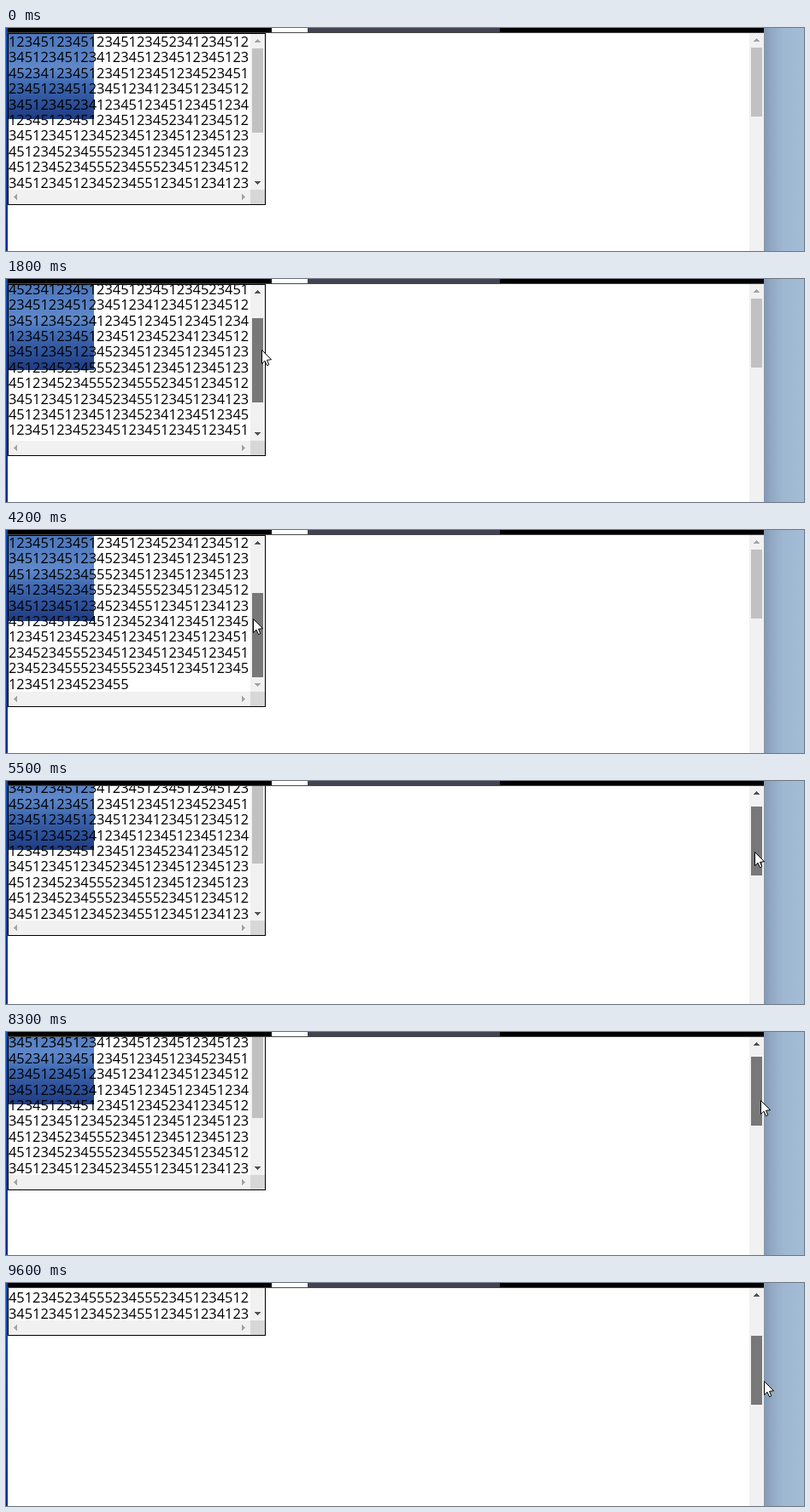
Write an HTML page with a canvas that moves like this. It is 934 px wide and 262 px high and loops after 10000 ms.

```html
<!DOCTYPE html>
<html lang="en">
<head>
<meta charset="utf-8">
<title>Scrolling box</title>
<style>
  html, body { margin: 0; width: 100%; height: 100%; overflow: hidden; background: #fff; }
  canvas { display: block; }
</style>
</head>
<body>
<canvas id="stage" width="934" height="262"></canvas>
<script>
const ctx = document.getElementById('stage').getContext('2d');
const LOOP = 10000, STEP = 100;
const LINE_HEIGHT = 18.4, BOX_RATIO = 1.86, PAGE_RATIO = 3.74;

// The text is the same count typed over and over, with short slips between.
const COUNT = '12345';
const BREAK = COUNT.repeat(3) + '1234';
const SLIPS = [
  '234' + BREAK, '234', '2345' + BREAK, '234' + BREAK, '234', '2345',
  '2345552345', '2345552345552345', '23455' + COUNT + '1234',
  '234', '2345', '2345552345', '2345552345552345', '23455'
];
const LINES = SLIPS.map(slip => COUNT.repeat(4) + slip).join('').match(/.{1,30}/g);

// Pointer strokes: [from ms, to ms, distance].
const STROKES_X = [
  [100, 1100, -589], [1100, 2500, 6], [2700, 4200, -13],
  [4350, 4600, 561], [4600, 4900, 26], [5500, 9600, 11]
];
const STROKES_Y = [
  [100, 1000, -192], [1000, 1800, 25], [1800, 3300, 29], [4180, 4440, -104],
  [4440, 4900, 68], [4900, 5400, 7], [5700, 6800, 20], [7000, 7400, 14],
  [7800, 8200, -35], [8200, 8500, -6], [8800, 9500, 39]
];
const BOX_DRAG = { from: 1200, to: 4500, grip: 58, max: 50 };
const PAGE_DRAG = { from: 4900, to: LOOP, grip: 76, max: 160 };

const clamp = (v, lo, hi) => Math.min(hi, Math.max(lo, v));

function travel(start, strokes, t) {
  return strokes.reduce((sum, [from, to, dist]) =>
    sum + dist * clamp((t - from) / (to - from), 0, 1), start);
}

const pointerX = t => Math.floor(travel(885, STROKES_X, t));
const pointerY = t => Math.round(travel(250, STROKES_Y, t));
const dragging = (drag, t) => t >= drag.from && t < drag.to;

// A dragged thumb trails the pointer by one step.
function thumbOffset(drag, t) {
  return dragging(drag, t) ? clamp(pointerY(t - STEP) - drag.grip, 0, drag.max) : 0;
}

function thumbColor(drag, t) {
  if (dragging(drag, t)) return '#787878';
  return t < drag.from && t >= drag.from - 2 * STEP ? '#a8a8a8' : '#c1c1c1';
}

function rect(x, y, w, h, fill) {
  ctx.fillStyle = fill;
  ctx.fillRect(x, y, w, h);
}

function clipped(x, y, w, h, draw) {
  ctx.save();
  ctx.beginPath();
  ctx.rect(x, y, w, h);
  ctx.clip();
  draw();
  ctx.restore();
}

function gradient(x0, y0, x1, y1, stops) {
  const g = ctx.createLinearGradient(x0, y0, x1, y1);
  stops.forEach(([p, c]) => g.addColorStop(p, c));
  return g;
}

// Stepped triangle; turns are quarter turns clockwise from up.
function arrow(x, y, turns, active) {
  ctx.save();
  ctx.translate(x, y);
  ctx.rotate(turns * Math.PI / 2);
  for (let i = 0; i < 4; i++) {
    rect(-i - 0.5, i - 2.5, 2 * i + 1, 1, active ? '#505050' : '#a3a3a3');
  }
  ctx.restore();
}

function drawPicture(x, y) {
  rect(x, y, 100, 100, gradient(0, y, 0, y + 100, [
    [0, '#4d77bd'], [0.4, '#5f88ca'], [0.6, '#3d67b0'], [1, '#1d3b82']
  ]));
}

function drawText(scroll) {
  ctx.font = '16.4px "Open Sans", "Noto Sans", sans-serif';
  ctx.fillStyle = '#000';
  LINES.forEach((line, i) => ctx.fillText(line, 3, Math.round(22 + i * LINE_HEIGHT) - scroll));
}

function drawBox(t) {
  const thumb = thumbOffset(BOX_DRAG, t);
  rect(2, 6, 302, 202, '#000');
  rect(3, 7, 300, 200, '#fff');
  clipped(3, 7, 283, 183, () => {
    drawPicture(3, 7);
    drawText(Math.round(thumb * BOX_RATIO));
  });
  rect(286, 7, 17, 183, '#f1f1f1');
  rect(3, 190, 283, 17, '#f1f1f1');
  rect(286, 190, 17, 17, '#d7d7d7');
  rect(288, 24 + thumb, 13, 99, thumbColor(BOX_DRAG, t));
  arrow(294.5, 15.5, 0, thumb > 0);
  arrow(294.5, 181.5, 2, thumb < BOX_DRAG.max);
  arrow(11.5, 198.5, 3, false);
  arrow(277.5, 198.5, 1, false);
}

function drawDesktop() {
  rect(0, 0, 934, 262, '#fff');
  rect(0, 0, 887, 5, '#000');
  rect(311, 0, 42, 5, '#fff');
  rect(353, 0, 225, 5, '#424252');
  rect(0, 5, 887, 1, '#484848');
  rect(0, 0, 2, 262, gradient(0, 0, 0, 262, [[0, '#0d47b4'], [1, '#0a2a92']]));
  rect(887, 0, 47, 262, gradient(887, 0, 934, 0, [
    [0, '#8398b2'], [0.2, '#92a9c4'], [0.5, '#9fb8d2'], [1, '#a3bdd6']
  ]));
}

function drawPointer(x, y) {
  ctx.save();
  ctx.translate(x + 0.5, y + 0.5);
  ctx.beginPath();
  [[0, 0], [0, 16], [3.5, 12.7], [6, 18.2], [8.3, 17.2], [6, 11.8], [11, 11.2]]
    .forEach(p => ctx.lineTo(...p));
  ctx.closePath();
  ctx.fillStyle = '#fff';
  ctx.fill();
  ctx.strokeStyle = '#000';
  ctx.stroke();
  ctx.restore();
}

function draw(t) {
  const thumb = thumbOffset(PAGE_DRAG, t);
  drawDesktop();
  clipped(2, 6, 885, 256, () => {
    ctx.translate(0, -Math.round(thumb * PAGE_RATIO));
    drawBox(t);
  });
  rect(870, 6, 17, 256, '#f1f1f1');
  rect(872, 23 + thumb, 13, 81, thumbColor(PAGE_DRAG, t));
  arrow(878.5, 14.5, 0, thumb > 0);
  if (t >= STEP) drawPointer(pointerX(t), pointerY(t));
}

const start = performance.now();
function tick() {
  const t = (performance.now() - start) % LOOP;
  draw(Math.floor(t / STEP) * STEP);
  requestAnimationFrame(tick);
}
tick();
</script>
</body>
</html>
```
